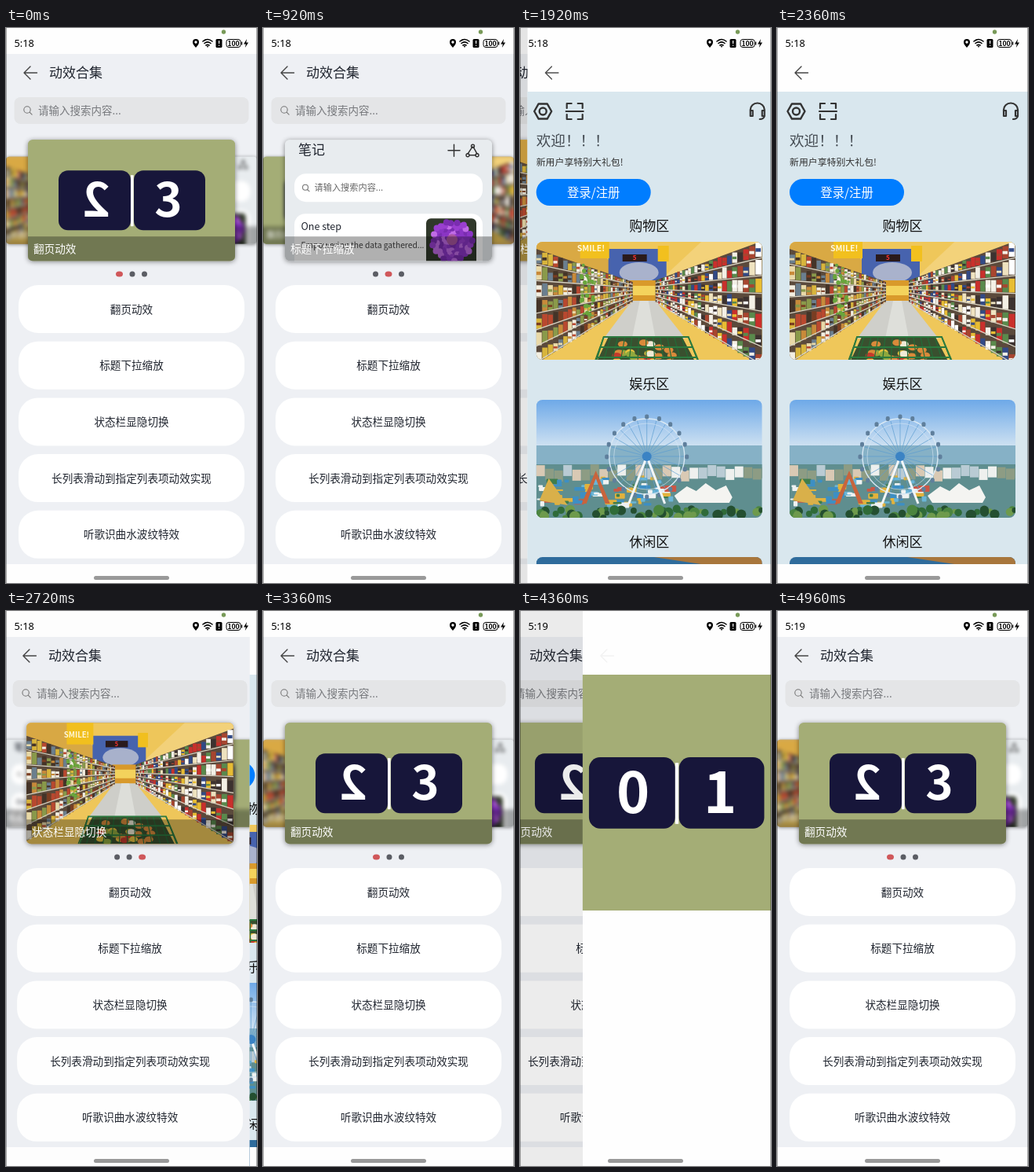
These frames come from a looping animation (320 px wide and 706 px high, 5.04 s). An HTML page:

```html
<!DOCTYPE html>
<html lang="zh-CN">
<meta charset="utf-8">
<style>
  html, body { margin: 0; width: 100%; height: 100%; overflow: hidden; background: #fff }
  svg { display: block }
  text { font-family: "Noto Sans CJK SC", "Noto Sans CJK", "Noto Sans", sans-serif; white-space: pre }
  .digit { font: 700 60px "Noto Sans", sans-serif; text-anchor: middle; fill: #fff }
  .line { fill: none; stroke: #333; stroke-linecap: round; stroke-linejoin: round }
</style>
<body>
<script>
const LOOP = 5040;
const OLIVE = '#a4ad76', NAVY = '#17163a', INK = '#20252f';

// Seeded random numbers
let seed = 7;
const rnd = () => (seed = (seed * 16807) % 2147483647) / 2147483647;
const pick = list => list[Math.floor(rnd() * list.length)];
const mix = (a, b, k) => a + (b - a) * k;
const repeat = (n, f) => Array.from({ length: n }, (_, i) => f(i)).join('');

// Markup helpers; text is placed by its vertical centre
const rect = (x, y, w, h, fill, r = 0, more = '') =>
  `<rect x="${x}" y="${y}" width="${w}" height="${h}" rx="${r}" fill="${fill}" ${more}/>`;
const text = (x, y, size, str, fill = INK, more = '') =>
  `<text x="${x}" y="${y + size * .37}" font-size="${size}" fill="${fill}" ${more}>${str}</text>`;
const middle = (y, size, str, weight = 400, fill = INK, x = 160) =>
  text(x, y, size, str, fill, `text-anchor="middle" font-weight="${weight}"`);
const path = (d, width = 1.5, more = '') => `<path class="line" d="${d}" stroke-width="${width}" ${more}/>`;
const poly = (points, fill) => `<polygon points="${points}" fill="${fill}"/>`;
const at = (x, y, inner, more = '') => `<g transform="translate(${x} ${y})" ${more}>${inner}</g>`;
const backArrow = path('M39.5 57H23M31 49L23 57L31 65', 1.4, 'style="stroke:#444"');
const lens = (x, y, r) => path(`M${x - r} ${y}a${r} ${r} 0 1 1 ${2 * r} 0a${r} ${r} 0 1 1 ${-2 * r} 0M${x + r * .75} ${y + r * .75}l${r * .7} ${r * .7}`, 1.1, 'style="stroke:#777"');

// Two flip tiles, 187 x 76
const tiles = (left, right) =>
  rect(0, 0, 92, 76, NAVY, 12) + rect(96, 0, 91, 76, NAVY, 12) + rect(92, 6, 3.6, 65, '#fff') +
  `<g class="digit">${left}<text x="140" y="59">${right}</text></g>`;

// Receding shelf with random goods
function shelf(nearX, farX, top, bottom, colors) {
  let out = poly(`${nearX},${top[0]} ${farX},${top[1]} ${farX},${bottom[1]} ${nearX},${bottom[0]}`, '#5b4a3c');
  const rows = 7;
  const yAt = (u, v) => mix(mix(top[0], bottom[0], v), mix(top[1], bottom[1], v), u);
  for (let r = 0; r < rows; r++) {
    for (let u = 0; u < .98;) {
      const step = .012 + .05 * (1 - u), end = Math.min(1, u + step);
      const x0 = mix(nearX, farX, u), x1 = mix(nearX, farX, end);
      const base = yAt(u, (r + .88) / rows), high = (base - yAt(u, r / rows)) * (.6 + .38 * rnd());
      out += rect(Math.min(x0, x1), base - high, Math.abs(x1 - x0) * .92, high, pick(colors));
      if (rnd() < .6) out += rect(Math.min(x0, x1), base - high * .6, Math.abs(x1 - x0) * .8, high * .25, pick(colors));
      u = end;
    }
    const v = (r + .93) / rows;
    out += `<path d="M${nearX} ${yAt(0, v)}L${farX} ${yAt(1, v)}" stroke="#d9d4c4" stroke-width="1.3"/>`;
  }
  return out;
}

// 288 x 168
const shop =
  rect(0, 0, 288, 168, '#efc75a') + poly('0,0 60,0 122,62 0,40', '#d9a944') + poly('288,0 220,0 160,56 288,40', '#f3d27a') +
  rect(92, 18, 74, 48, '#4763ae') + '<ellipse cx="131" cy="48" rx="25" ry="13" fill="#a9b2cc"/>' +
  rect(110, 25, 31, 9, '#2a1a1c') + text(123, 29.5, 8, '5', '#f33', 'font-weight="700"') +
  rect(56, 0, 37, 30, '#f2c01e') + text(52, 17, 10.5, 'SMILE!', '#fff7d8', 'font-weight="800"') +
  rect(155, 14, 14, 20, '#f2c01e') + rect(119, 58, 36, 28, '#d99a2b') + rect(122, 65, 30, 12, '#f4d35c') +
  poly('122,84 152,84 190,132 86,132', '#cfcfca') + poly('132,84 143,84 152,132 122,132', '#dedfda') +
  shelf(0, 123, [18, 60], [164, 86], ['#c88a3a', '#e9d9a8', '#7a3d22', '#f3efe2', '#d8b53c', '#8a9a4a', '#443428', '#b9482f', '#6b7f8f']) +
  shelf(288, 152, [8, 58], [167, 86], ['#c9302c', '#f4f0e6', '#e8bd33', '#324a86', '#efe3c0', '#a8452f', '#5a8a4c', '#ffffff', '#3c3230']) +
  repeat(34, () => `<circle cx="${54 + rnd() * 22}" cy="${36 + rnd() * 66}" r="${1 + rnd() * 2}" fill="#69a53c"/>`) +
  poly('92,130 186,130 206,168 74,168', '#39502f') +
  repeat(26, () => `<ellipse cx="${100 + rnd() * 80}" cy="${137 + rnd() * 28}" rx="6" ry="4" fill="${pick(['#e8c23e', '#f0ead6', '#c43a2c', '#8fa83e', '#d98a3a'])}"/>`) +
  repeat(13, i => `<path d="M${86 + i * 9} 130L${72 + i * 11.4} 168" stroke="#236b38" stroke-width="1.2"/>`) +
  '<path d="M74 168L86 130H194L210 168M82 143H199M78 156H205" stroke="#2c7a3f" stroke-width="2" fill="none"/>';

// 288 x 150
const spoke = (i, n, r) => [141 + r * Math.cos(i / n * 6.283), 72 + r * Math.sin(i / n * 6.283)];
const park =
  rect(0, 0, 288, 62, 'url(#sky)') + rect(0, 58, 288, 42, '#86b1c6') + rect(0, 82, 288, 68, '#5f8e8f') +
  repeat(26, i => rect(i * 11.5, 82 + rnd() * 8, 11, 14, pick(['#eef0ee', '#d9c9b4', '#b9cbd4', '#8d9c84']))) +
  repeat(70, () => rect(rnd() * 170, 96 + rnd() * 36, 4 + rnd() * 12, 2 + rnd() * 6, pick(['#3d8fc4', '#e2b23c', '#cc5745', '#eef2f2', '#3f7d4c', '#6ab5d6']), 1)) +
  poly('58,132 76,90 94,132 88,132 76,100 64,132', '#c8643c') + poly('4,128 16,100 40,134', '#d9b04a') +
  repeat(24, i => `<path d="M141 72L${spoke(i, 24, 48)}" stroke="#5c9dd0" stroke-width=".7"/>`) +
  '<g fill="none" stroke="#d8e8f4"><circle cx="141" cy="72" r="48" stroke-width="1.4"/><circle cx="141" cy="72" r="42" stroke-width=".6"/></g>' +
  repeat(20, i => { const [x, y] = spoke(i, 20, 51); return rect(x - 2.5, y - 2.5, 5, 6, '#5f7f9c', 2); }) +
  '<path d="M141 72L118 132M141 72L164 132" stroke="#f2f6f8" stroke-width="3"/><circle cx="141" cy="72" r="6" fill="#3b83c4"/>' +
  poly('176,122 192,110 204,116 216,106 229,115 242,109 250,124 246,131 182,131', '#f4f4f1') +
  repeat(60, () => `<circle cx="${rnd() * 288}" cy="${138 + rnd() * 12}" r="${3 + rnd() * 4}" fill="${pick(['#2f6b38', '#4b8540', '#244f30', '#6e9a4c'])}"/>`);

const flower = rect(0, 0, 64, 64, '#30382a', 6) +
  repeat(90, i => {
    const r = 26 * Math.sqrt(i / 90), a = i * 2.4;
    return `<circle cx="${33 + r * Math.cos(a)}" cy="${29 + r * Math.sin(a)}" r="4" fill="${pick(['#9a3fd0', '#7a2db0', '#c06be6', '#8a35c4'])}"/>`;
  }) + '<circle cx="33" cy="27" r="7" fill="#a8569f"/>';

// Carousel cards, 264 x 154
const cards = [
  ['翻页动效', OLIVE, at(39, 39, tiles('<text transform="translate(48 59) scale(-1 1)">2</text>', '3'))],
  ['标题下拉缩放', '#e8ecef',
    text(17, 13, 17, '笔记', INK, 'font-weight="500"') +
    path('M208 13.5H223M215.5 6V21M239 9L233 18M240 9L245 18M235 19.5H243') +
    repeat(3, i => `<circle class="line" cx="${[239.5, 233, 245][i]}" cy="${[8, 19.5, 19.5][i]}" r="2" stroke-width="1.4"/>`) +
    rect(12, 43, 240, 36, '#fff', 15) + lens(26, 60.5, 3.5) + text(37.5, 61, 11.2, '请输入搜索内容...', '#666') +
    rect(12, 94, 240, 80, '#fff', 14) + text(20.5, 110, 12.5, 'One step') +
    text(20.5, 134, 10.3, 'Empowering the data gathered...', '#444') + at(180, 100, flower)],
  ['状态栏显隐切换', '#c9a765', '<use href="#shop" transform="scale(.9167)"/>']
];
const card = ([title, color, art]) =>
  `<g class="card">${rect(0, 0, 264, 154, color, 6, 'style="filter:drop-shadow(0 1px 3px #0007)"')}
   <g clip-path="url(#cardClip)"><g class="art">${rect(-9, -9, 282, 172, color)}${art}
   ${rect(-9, 123, 282, 40, '#000', 0, 'opacity=".31"')}${text(7, 138.5, 13.6, title, '#fff', 'font-weight="500"')}</g></g></g>`;

const entries = ['翻页动效', '标题下拉缩放', '状态栏显隐切换', '长列表滑动到指定列表项动效实现', '听歌识曲水波纹特效'];
const home = rect(0, 0, 320, 706, '#fefefe') + rect(0, 33, 320, 649, '#eef0f4') +
  `<g id="title">${backArrow}${text(55, 57, 17, '动效合集', INK, 'font-weight="500"')}</g>` +
  rect(10.5, 88, 299, 34, '#e4e5e7', 8) + lens(27, 104, 4.2) + text(41, 105, 13.5, '请输入搜索内容...', '#77797d') +
  `<g id="deck">${cards.map(card).join('')}</g>` + repeat(3, () => '<ellipse class="dot" cy="313" ry="3.5"/>') +
  entries.map((name, i) => rect(16, 327 + i * 71.7, 288, 61, '#fff', 25) + middle(357.5 + i * 71.7, 13.6, name, 500)).join('');

const photo = (y, art) => at(16, y, art, 'clip-path="url(#photoClip)"');
const hexagon = repeat(6, i => `${i ? 'L' : 'M'}${24.5 + 11 * Math.cos(i * 1.0472)} ${106 + 11 * Math.sin(i * 1.0472)}`) + 'Z';
const shopPage = rect(-160, 81, 640, 601, '#d9e7ee') +
  `<g style="--c:#000">${path(hexagon, 2.4)}<circle class="line" cx="24.5" cy="106" r="4.5" stroke-width="2.4"/>` +
  path('M55 102V96H61M69 96H75V102M75 110V116H69M61 116H55V110M54 106H76', 2.2) +
  path('M289 107V104A9 8.500 0 0 1 307 104V107M289 105h3v7h-3zM304 105h3v7h-3zM307 112Q306 116 301 116', 2.2) + '</g>' +
  text(16, 143, 18.6, '欢迎！！！', '#444b52') + text(16, 171, 11.9, '新用户享特别大礼包!', '#333') +
  rect(16, 192, 146, 34, '#007dff', 17) + middle(209, 15.4, '登录/注册', 500, '#fff', 89) +
  ['购物区', '娱乐区', '休闲区'].map((name, i) => middle(252 + i * 201, 17, name, 500, '#111')).join('') +
  photo(272, '<use href="#shop" y="-9"/>') + photo(473, park) +
  photo(673, rect(0, 0, 288, 150, '#2f6c9c') + poly('150,0 288,0 288,40 230,12', '#a8763c'));
const flipPage = rect(-160, 81, 640, 300, OLIVE) +
  `<g transform="translate(48 186) scale(1.195)">${tiles('<text x="47" y="59">0</text>', '1')}</g>`;

const status =
  `<text id="clock" x="10.5" y="24" font-size="12.8" font-weight="500" style="font-family:'Noto Sans',sans-serif"></text>` +
  '<circle cx="277.500" cy="5" r="2.7" fill="#789a58"/>' +
  '<path fill-rule="evenodd" d="M242 25C239 21.500 238 20 238 18a4 4 0 0 1 8 0C246 20 245 21.500 242 25ZM242 16.300a1.700 1.700 0 1 0 .01 0Z"/>' +
  path('M251 17Q257 12 263 17M253 19.500Q257 16.300 261 19.500M255 22Q257 20.500 259 22', 1.6, 'style="stroke:#000"') +
  '<circle cx="257" cy="23.500" r="1.1"/>' + rect(267.5, 14, 8, 11, '#000', 1.5) + rect(271, 16, 1.2, 4, '#fff') + rect(271, 21.5, 1.2, 1.3, '#fff') +
  rect(281, 14.5, 18, 10, 'none', 3, 'stroke="#000"') + rect(300, 17.5, 1.2, 4, '#000') + middle(19.4, 8.6, '100', 700, '#000', 290) +
  '<path d="M307 14L303 20.500H305.800L304.800 25L309 18.500H306.200Z"/>';

document.body.innerHTML = `<svg width="320" height="706">
  <defs>
    <g id="shop">${shop}</g>
    <clipPath id="cardClip"><rect width="264" height="154" rx="6"/></clipPath>
    <clipPath id="photoClip"><rect width="288" height="150" rx="8"/></clipPath>
    <linearGradient id="sky" x2="0" y2="1"><stop stop-color="#6ea9e8"/><stop offset="1" stop-color="#d3e4f2"/></linearGradient>
  </defs>
  <g id="home">${home}</g>
  <rect id="shade" width="320" height="706"/>
  <svg id="page" width="320" height="706">${rect(0, 0, 320, 706, '#fefefe')}
    <g id="content"><g id="shopPage">${shopPage}</g><g id="flipPage">${flipPage}</g></g>
    ${rect(0, 682, 320, 24, '#fefefe')}<g id="bar">${backArrow}</g></svg>
  ${status}${rect(112, 697, 96, 5, '#999', 2.5)}
  ${rect(0, 0, 1, 706, '#000', 0, 'opacity=".33"')}${rect(319, 0, 1, 706, '#000', 0, 'opacity=".33"')}
</svg>`;

const $ = id => document.getElementById(id);
const cardNodes = [...document.querySelectorAll('.card')];
const dots = [...document.querySelectorAll('.dot')];
const move = (node, x) => node.setAttribute('transform', `translate(${x} 0)`);
const clamp = v => Math.max(0, Math.min(1, v));
const swipe = (t, start) => 1 - (1 - clamp((t - start) / 400)) ** 3;
// Critically damped spring from 0 to 1
const spring = (t, start) => {
  const z = Math.max(0, t - start) * .02;
  return 1 - (1 + z) * Math.exp(-z);
};

function drawDeck(pos) {
  const placed = cardNodes.map((node, i) => {
    const d = (i - pos + 4.5) % 3 - 1.5, far = Math.abs(d), k = Math.min(1, far);
    const offset = far > 1 ? Math.sign(d) * (3 - 2 * far) : d;
    const scale = 1 - .28 * k;
    node.setAttribute('transform', `translate(${160 + 65 * offset} 219.2) scale(${scale}) translate(-132 -77)`);
    node.querySelector('.art').style.filter = k > .01 ? `blur(${3.5 * k}px)` : 'none';
    return { node, far };
  });
  placed.sort((a, b) => b.far - a.far).forEach(p => $('deck').append(p.node));

  const active = Math.round(pos) % 3;
  let x = 140;
  dots.forEach((dot, i) => {
    const r = i === active ? 4.5 : 3.5;
    dot.setAttribute('cx', x + r);
    dot.setAttribute('rx', r);
    dot.setAttribute('fill', i === active ? '#d0575a' : '#5b5d64');
    x += 2 * r + 8.5;
  });
}

function drawPage(t, p) {
  const x = 320 * (1 - p), second = t > 3300;
  move($('home'), -64 * p);
  move($('title'), 27 * p * (1 - p));
  $('shade').setAttribute('opacity', .1 * p);
  $('page').setAttribute('x', x);
  $('page').style.display = p < .002 ? 'none' : '';
  move($('content'), -x / 2);
  $('bar').setAttribute('opacity', clamp((p - .735) / .25));
  $('shopPage').style.display = second ? 'none' : '';
  $('flipPage').style.display = second ? '' : 'none';
}

function frame() {
  const t = performance.now() % LOOP;
  drawDeck(swipe(t, 400) + swipe(t, 1120) + swipe(t, 2920));
  drawPage(t, spring(t, 1652) - spring(t, 2452) + spring(t, 3680) - spring(t, 4313));
  $('clock').textContent = t < 4000 ? '5:18' : '5:19';
  requestAnimationFrame(frame);
}
frame();
</script>
</body>
</html>
```
